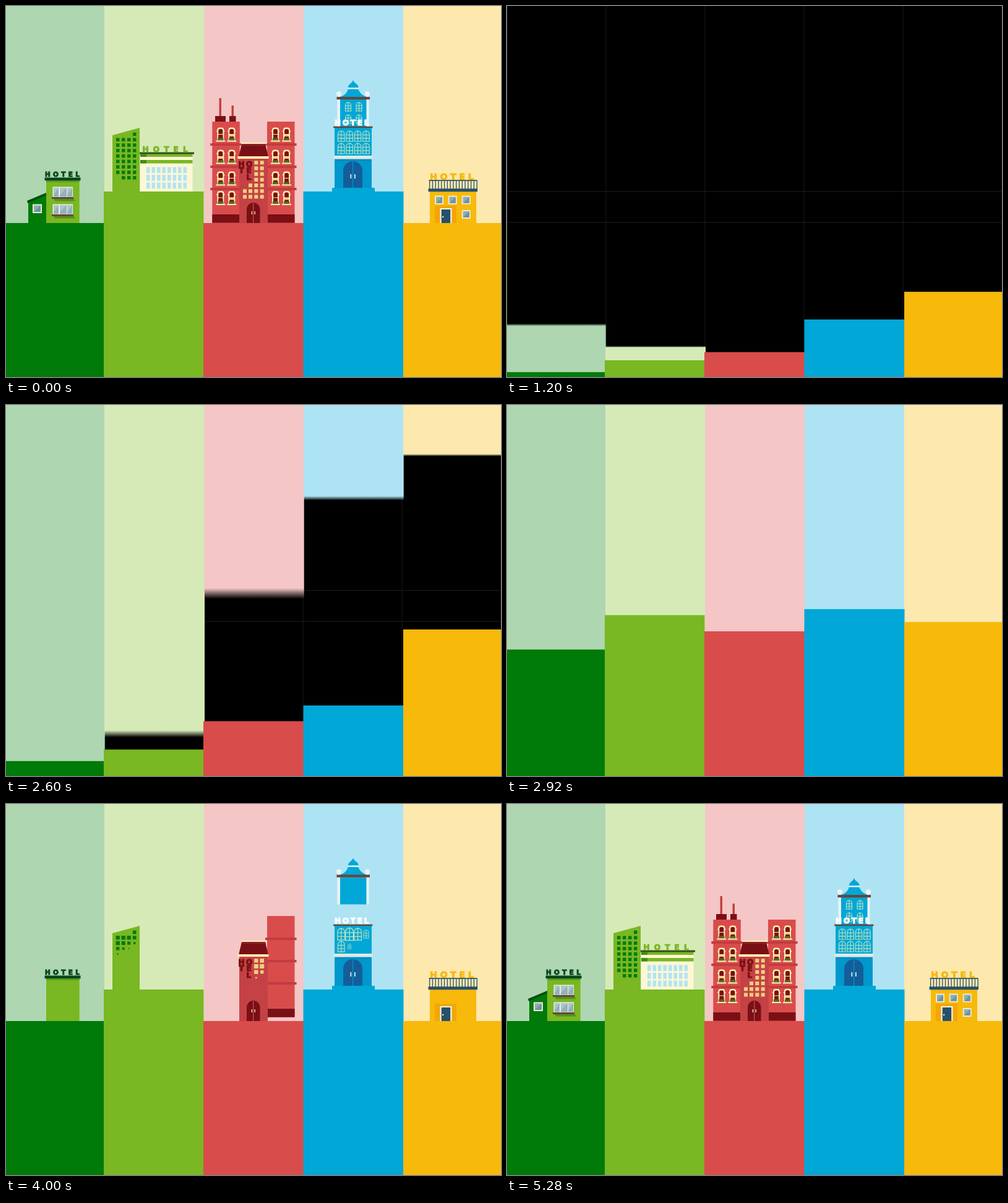
Write an HTML page with a canvas that moves like this. It is 800x600 px and loops after 5320 ms.

```html
<!DOCTYPE html>
<html lang="en">
<head>
<meta charset="utf-8">
<title>Five hotels</title>
<style>
html, body { margin: 0; width: 100%; height: 100%; overflow: hidden; background: #000; }
canvas { display: block; }
</style>
</head>
<body>
<canvas id="stage" width="800" height="600"></canvas>
<script>
const g = document.getElementById('stage').getContext('2d');
const LOOP = 5320, TURN = 1720;
const DARK = '#791015', CREAM = '#fdeeb0', NAVY = '#27506b', BROWN = '#68453a';
const skyX = [0, 159, 320.3, 481, 642, 800];
const landX = [0, 158, 319, 480.5, 642, 800];
const skies = ['#aed6b1', '#d6eab8', '#f4c6c6', '#aee3f4', '#fde8ae'];
const lands = ['#007a08', '#79b723', '#d94c4c', '#00a7d7', '#f7b90a'];
const rest = [351, 300, 351, 300, 351];
// start and duration of each ground's return
const rise = [[2223, 1155], [2155, 1200], [2018, 1243], [1822, 1640], [1876, 967]];
let clock = 0;

// cubic-bezier(.8, 0, .2, 1)
function ease(x) {
  if (x <= 0) return 0;
  if (x >= 1) return 1;
  let a = 0, b = 1, s;
  for (let i = 0; i < 22; i++) {
    s = (a + b) / 2;
    const u = 1 - s;
    if (2.4 * s * u * u + .6 * s * s * u + s * s * s < x) a = s; else b = s;
  }
  return s * s * (3 - 2 * s);
}

// remaining distance of a move that overshoots: 1 -> below 0 -> 0
function back(start, dur) {
  const q = Math.min(0, (clock - start) / dur - 1);
  return -(3.5 * q + 2.5) * q * q;
}

function box(c, x, y, w, h) { g.fillStyle = c; g.fillRect(x, y, w, h); }

function poly(c, ...p) {
  g.fillStyle = c;
  g.beginPath();
  for (let i = 0; i < p.length; i += 2) g.lineTo(p[i], p[i + 1]);
  g.fill();
}

function disc(c, x, y, r) {
  g.fillStyle = c;
  g.beginPath();
  g.arc(x, y, r, 0, 7);
  g.fill();
}

function arch(c, x, y, w, h, r = w / 2) {
  g.fillStyle = c;
  g.beginPath();
  g.roundRect(x, y, w, h, [r, r, 0, 0]);
  g.fill();
}

function sign(s, c, x, y, size, gap) {
  g.font = `bold ${size}px "DejaVu Sans", Verdana, sans-serif`;
  g.letterSpacing = gap + 'px';
  g.fillStyle = g.strokeStyle = c;
  g.lineWidth = 1;
  g.fillText(s, x, y);
  g.strokeText(s, x, y);
}

function part(start, dur, height, draw) {
  if (clock < start) return;
  g.save();
  g.translate(0, height * back(start, dur));
  draw();
  g.restore();
}

function pop(start, x, y, draw) {
  if (clock < start) return;
  const k = 1 - back(start, 240);
  g.save();
  g.translate(x, y);
  g.scale(k, k);
  g.translate(-x, -y);
  draw();
  g.restore();
}

function dots(c, start, xs, y, size) {
  xs.forEach((x, i) => pop(start + i * 25, x + size / 2, y + size / 2, () => box(c, x, y, size, size)));
}

function pane(start, x, y, w = 14, h = 14) {
  pop(start, x + w / 2, y + h / 2, () => {
    box('#e6ead8', x, y, w, h);
    box('#8fabb2', x + 2, y + 2, w - 4, h - 4);
    poly('#6f929e', x + w - 2, y + 2, x + w - 2, y + h - 2, x + 2, y + h - 2);
  });
}

function house() {
  part(4090, 450, 50, () => {
    poly(lands[0], 36, 317, 65, 305, 65, 351, 36, 351);
    poly('#00500f', 34, 315, 65, 302, 65, 306, 35, 319);
    pane(4300, 43, 320.5, 15, 14.5);
  });
  part(2988, 600, 85, () => {
    box(lands[1], 65, 281, 53.7, 70);
    box('#619c1c', 65, 282, 53.7, 3);
    box('#05471b', 62.5, 277.5, 58, 4.7);
    sign('HOTEL', '#05471b', 63, 275.7, 10.4, 4.4);
    [292.5, 320.5].forEach((y, i) => pop(4150 + i * 120, 92, y + 9, () => {
      poly('#57901a', 76, y + 17, 108, y + 17, 112, y + 23, 79, y + 23);
      box('#e6efe0', 75.5, y, 32.5, 17);
      [77, 87, 99].forEach((x, k) => {
        const w = k == 1 ? 11 : 8;
        box('#94b1b9', x, y + 1.5, w, 14.5);
        poly('#aec5cb', x, y + 1.5, x + w, y + 1.5, x, y + 13);
      });
      box(BROWN, 74, y + 16.5, 35, 3);
    }));
  });
}

function office() {
  part(4640, 500, 75, () => {
    box('#fdf7d5', 217, 239, 84.5, 61);
    box(lands[1], 217, 239, 84.5, 5);
    box(lands[1], 217, 249, 84.5, 5.5);
    box('#3f8d14', 217, 240, 10, 4);
    box('#3f8d14', 217, 249, 10, 5.5);
    box('#32501a', 216, 236.5, 88, 3);
    sign('HOTEL', lands[1], 220.5, 235.8, 12, 7.2);
    for (let r = 0; r < 3; r++) for (let i = 0; i < 8; i++)
      pop(4800 + r * 60 + i * 15, 230 + i * 8.5, 265 + r * 12.5,
        () => box('#b3e3f5', 227 + i * 8.5, 260.5 + r * 12.5, 5.5, 9.7));
  });
  part(3354, 600, 105, () => {
    poly(lands[1], 172, 209, 216, 197, 216, 300, 172, 300);
    const cols = [178, 187, 196, 205];
    for (let r = 0; r < 9; r++)
      dots(lands[0], 3800 + r * 45, r == 0 ? [205] : r == 8 ? cols.slice(1) : cols, 204.7 + r * 8.8, 5.4);
  });
}

function gothicWindow(start, x, y, lit) {
  pop(start, x + 6, y + 12, () => {
    arch(CREAM, x + 1, y, 11, 21, 4);
    box(CREAM, x, y + 5, 13, 2);
    arch(DARK, x + 3, y + 2.5, 7, 8, 2.5);
    box(lit ? '#f0cf80' : DARK, x + 3, y + 11.5, 7, 8);
    box(DARK, x + 3, y + 14.5, 7, 4);
    box('#4b6d22', x + 2, y + 17, 9, 4);
    box('#8b2b24', x + 3.5, y + 16, 2, 2);
    box(CREAM, x - 1, y + 21, 15, 2);
  });
}

function wing(x, start, left) {
  part(start, left ? 600 : 620, left ? 202 : 165, () => {
    if (left) {
      box('#c43f40', 344.5, 149, 3.5, 30);
      box('#c43f40', 364.5, 161, 3.5, 18);
      box(DARK, 338, 178, 17, 9.5);
      box(DARK, 361, 178, 10.5, 9.5);
    }
    box(lands[2], x, 187, 44.5, 164);
    [222, 258, 294].forEach(y => box('#c13c41', x - 3, y, 50.5, 4));
    box(DARK, x, 337, 44.5, 13.5);
    [196.5, 232.5, 267.5, 299].forEach((y, r) => [7, 25].forEach((dx, i) =>
      gothicWindow(4740 + r * 70 + i * 50 + (left ? 0 : 60), x + dx, y, (r + i) % 3 != 0)));
  });
}

function manor() {
  wing(333.3, 4138, true);
  wing(422, 3462, false);
  part(3370, 600, 135, () => {
    box('#c44245', 377, 246, 46, 105);
    poly(DARK, 381, 223, 419, 223, 424, 244, 376, 244);
    box('#95272b', 380, 225, 40, 1);
    for (let x = 380; x < 420; x += 3) box(CREAM, x, 220.5, 2.3, 2.7);
    box(CREAM, 374.5, 243, 50, 4);
    const cols = [383, 392, 401.3, 410.7];
    [3, 3, 3, 3, 2, 1, 1].forEach((n, r) =>
      dots('#f0cf80', 3800 + r * 60, cols.slice(n == 3 ? 2 : n - 1), 250.3 + r * 9.2, 6));
    sign('HO', DARK, 375.5, 259.5, 12, 2.5);
    sign('T', DARK, 376.5, 270, 12, 0);
    sign('E', DARK, 388.5, 270, 12, 0);
    sign('L', DARK, 388.5, 280.5, 12, 0);
    arch(DARK, 389, 318, 21.5, 33);
    box('#d9605f', 399.2, 319, 1, 32);
    box(CREAM, 396.7, 332, 1.3, 5);
    box(CREAM, 401.5, 332, 1.3, 5);
  });
}

function sash(start, x, y, w, h) {
  pop(start, x + w / 2, y + h / 2, () => {
    g.strokeStyle = '#c5e5b9';
    g.lineWidth = 1.1;
    g.beginPath();
    g.roundRect(x, y, w, h, [w / 2, w / 2, 0, 0]);
    g.moveTo(x + w / 2, y);
    g.lineTo(x + w / 2, y + h);
    for (const k of [.38, .7]) {
      g.moveTo(x, y + h * k);
      g.lineTo(x + w, y + h * k);
    }
    g.stroke();
  });
}

function gable() {
  const blue = lands[3];
  part(3359, 1100, 180, () => {
    g.fillStyle = blue;
    g.beginPath();
    g.moveTo(536, 148);
    g.quadraticCurveTo(551, 145, 553, 133);
    g.quadraticCurveTo(552, 129, 557, 125);
    g.quadraticCurveTo(560, 123, 561, 120);
    g.quadraticCurveTo(562, 123, 565, 125);
    g.quadraticCurveTo(571, 129, 569, 133);
    g.quadraticCurveTo(572, 145, 587, 148);
    g.fill();
    box('#e9f4f5', 552.5, 132, 17.5, 2.5);
    for (const x of [538, 584]) {
      disc('#e9f4f5', x, 142, 4);
      box('#e9f4f5', x - 2, 144, 4, 4);
    }
    box('#e9f4f5', 535.5, 151, 51, 44);
    box(blue, 540, 151, 42.5, 44);
    box(BROWN, 534.5, 147, 53.5, 4.2);
    for (let r = 0; r < 2; r++) for (let i = 0; i < 2; i++)
      sash(4160 + r * 90 + i * 60, 548.5 + i * 17.5, 156 + r * 20, 9, 14);
  });
  part(3382, 600, 105, () => {
    box(blue, 531, 196, 60, 104);
    box('#0097cd', 531, 247, 60, 47);
    box(BROWN, 529, 194.7, 63.5, 2.5);
    box('#e3e9e2', 530, 242, 62, 5.5);
    for (let x = 533; x < 590; x += 3) box('#087db8', x, 249, 1.5, 1.5);
    for (let r = 0; r < 2; r++) for (let i = 0; i < 4; i++)
      sash(3820 + r * 110 + i * 45, 536.5 + i * 13.4, 202 + r * 20, 10.5, 17);
    arch('#135e9a', 545, 251, 31, 43);
    box('#0097cd', 560, 251, 1.2, 43);
    box('#e9f4f5', 556.5, 272, 1.7, 7);
    box('#e9f4f5', 563, 272, 1.7, 7);
    box(blue, 527, 294, 69, 6);
    sign('HOTEL', '#fff', 531, 193, 12, 2.8);
  });
}

function motel() {
  part(2978, 600, 80, () => {
    box(lands[4], 685, 299, 75, 52);
    sign('HOTEL', lands[4], 685, 281, 14.3, 4.5);
    for (let x = 684; x < 762; x += 4.78) box(NAVY, x, 282, 1.3, 14);
    box(NAVY, 683.5, 281.3, 78, 1.7);
    box(NAVY, 682.5, 295.3, 79.5, 5);
    box('#f4a50a', 693, 323, 35, 28);
    box('#fbf4dc', 701.5, 327, 19, 24);
    box(NAVY, 703.7, 329, 14.5, 22);
    disc('#fbf4dc', 706.2, 341, 1.2);
    [[693, 306.7], [714.7, 306.7], [736.7, 306.7], [736.7, 330]].forEach(([x, y], i) => pane(4050 + i * 80, x, y));
  });
}

const hotels = [house, office, manor, gable, motel];
const drop = (i, t) => 615 * ease((t - 305 + 75.5 * i) / 1450);
// the sky reaches a little above the stage before it leaves
const skyTop = (i, t) => drop(i, t) - 2;
const skyBottom = (i, t) => 750 * ease((t - 1757 - 96 * i) / 1355);

function landTop(i, t) {
  if (t < TURN) return rest[i] + (614 - rest[i]) * ease((t - 198 - 75 * i) / 1450);
  const [start, dur] = rise[i];
  return 600 - (600 - rest[i]) * ease((t - start) / dur);
}

// sky block whose moving edge is softened in proportion to its speed
function drawSky(i, t, leaving) {
  const edge = leaving ? skyTop : skyBottom;
  const a = edge(i, t - 3.5), b = edge(i, t + 3.5);
  const x = skyX[i], w = skyX[i + 1] - x + .7;
  if (b - a < .5) {
    const y = Math.round((a + b) / 2);
    box(skies[i], x, leaving ? y : 0, w, leaving ? 600 - y : y);
    return;
  }
  const soft = g.createLinearGradient(0, a, 0, b);
  soft.addColorStop(leaving ? 1 : 0, skies[i]);
  soft.addColorStop(leaving ? 0 : 1, skies[i] + '00');
  box(soft, x, leaving ? a : 0, w, leaving ? 600 - a : b);
}

function draw(t) {
  const leaving = t < TURN;
  clock = leaving ? 1e5 : t;
  box('#000', 0, 0, 800, 600);
  for (const x of [0, 159.5, 319.5, 479.5, 639.5, 799]) box('#1b1b1b', x, 0, 1, 600);
  for (const y of [299.5, 349.5]) box('#202020', 0, y, 800, 1);
  if (t >= 1600 && t < 1800) return;
  for (let i = 0; i < 5; i++) {
    drawSky(i, t, leaving);
    g.save();
    if (leaving) g.translate(0, drop(i, t));
    hotels[i]();
    g.restore();
  }
  for (let i = 0; i < 5; i++) {
    const y = landTop(i, t);
    if (y < 600) box(lands[i], landX[i], y, landX[i + 1] - landX[i] + .5, 600 - y);
  }
}

const begin = performance.now();
function tick() {
  const t = (performance.now() - begin) % LOOP;
  draw(Math.floor(t / 40) * 40);
  requestAnimationFrame(tick);
}
tick();
</script>
</body>
</html>
```
